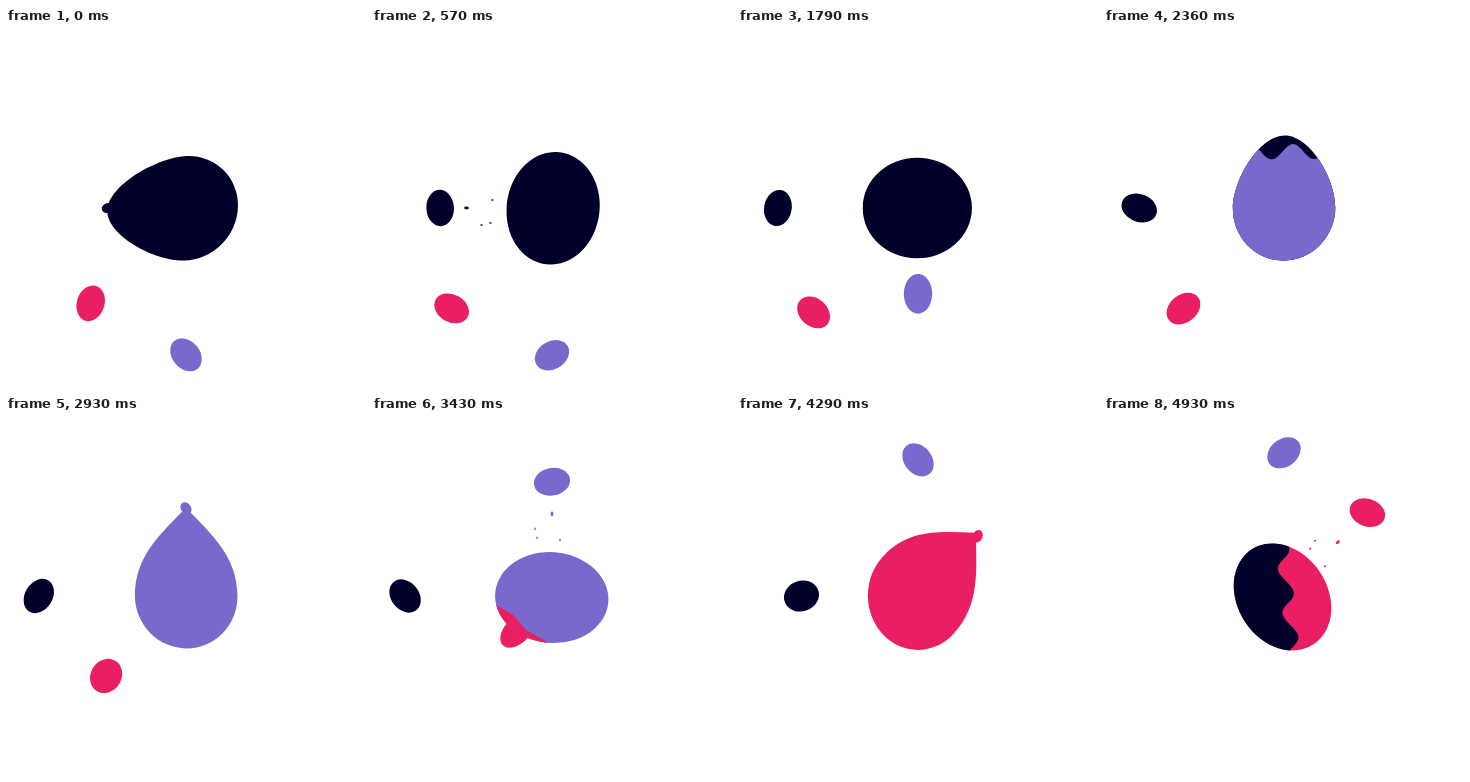
Write an HTML page with a canvas that moves like this. It is 360 px wide and 360 px high and loops after 5000 ms.

```html
<!DOCTYPE html>
<html lang="en">
<head>
<meta charset="utf-8">
<title>Colour drops</title>
<style>
  html, body { margin: 0; width: 100%; height: 100%; overflow: hidden; background: #fff; }
  canvas { display: block; width: 360px; height: 360px; }
</style>
</head>
<body>
<canvas id="stage"></canvas>
<script>
const LOOP = 5000, STEPS = 70, ORBIT = 5600;
const BALL = 52, DROP = 16;
const NAVY = '#00002a', VIOLET = '#7a69cd', PINK = '#e91e63';

// Each pass: a drop flies through the ball and leaves it at time `exit`.
// Below, `time` is always relative to that moment, in ms.
const passes = [
  { color: PINK, heading: 135, exit: -1400 },
  { color: NAVY, heading: 180, exit: 0 },
  { color: VIOLET, heading: -90, exit: 2800 },
  { color: PINK, heading: -45, exit: 4200 },
  { color: NAVY, heading: 0, exit: 5600 }
];
const TOUCH = -870, COVERED = -210;
const specks = [[82, 0], [67, -17], [58, -15], [56, 8]];

const canvas = document.getElementById('stage');
const ctx = canvas.getContext('2d');
const ratio = window.devicePixelRatio || 1;
canvas.width = canvas.height = 360 * ratio;

const rad = deg => deg * Math.PI / 180;
const clamp = x => Math.min(1, Math.max(0, x));

// Smooth step from 0 at `from` to 1 at `to`.
function ramp(time, from, to) {
  const k = clamp((time - from) / (to - from));
  return k * k * (3 - 2 * k);
}

const phase = time => (time + ORBIT) % ORBIT;
const falling = time => Math.max(0, phase(time) - 2800) / 1000;

// Signed position on the heading: slows down on the way out, then falls back.
function travel(time) {
  const distance = 150 - 72 * Math.exp(-phase(time) / 900) - 7.9 * falling(time) ** 3.6;
  return time < 0 ? -distance : distance;
}

// Squeezed while being hit, then a damped swing after the drop has left.
function squash(time) {
  const hit = -2.5 * Math.sin(Math.PI * ramp(time, TOUCH, -440));
  const t = Math.max(0, time - 300);
  return hit - 9 * Math.exp(-t / 1200) * Math.sin(2 * Math.PI * t / 1900);
}

function dropSize(time) {
  if (time < -40) return clamp((-600 - time) / 180);
  return .35 + .65 * ramp(time, 100, 400);
}

function ellipse(x, y, rx, ry, turn = 0) {
  ctx.beginPath();
  ctx.ellipse(x, y, rx, ry, turn, 0, 2 * Math.PI);
  ctx.fill();
}

function drawDrop(pass, time) {
  if (Math.abs(time) > ORBIT / 2) return;
  const size = dropSize(time);
  const speed = (falling(time) / 1.8) ** 3;
  const wobble = 2.2 * clamp(1 - speed);
  ctx.save();
  ctx.rotate(rad(pass.heading));
  ctx.fillStyle = pass.color;
  if (time > 480 && time < 800) {
    specks.forEach(([u, v], i) => {
      const r = i ? 1 : 1.8;
      ellipse(u - .06 * (time - 630), v, r * 1.3, r * .8);
    });
  }
  ctx.translate(travel(time), 0);
  ctx.scale(size * (1 + .25 * speed), size * (1 - .12 * speed));
  if (size > 0) ellipse(0, 0, DROP + wobble, DROP - wobble, rad(166 - .138 * phase(time)));
  ctx.restore();
}

// A round back and a front that swells, sharpens and snaps back.
function ballPath(heading, time) {
  const rise = ramp(time, -700, -350);
  const hold = 1 - ramp(time, 200, 420);
  const point = ramp(time, 0, 90) * hold;
  const reach = Math.max(BALL + 24 * rise, travel(time));
  const tip = BALL + (reach - BALL) * hold;
  const shoulder = 29 + 11 * point;
  const x = tip * (1 - .29 * point), y = 29 - 4 * rise * hold;
  ctx.save();
  ctx.rotate(rad(heading));
  ctx.beginPath();
  ctx.arc(0, 0, BALL, Math.PI / 2, Math.PI * 1.5);
  ctx.bezierCurveTo(shoulder, -BALL, x, -y, tip, 0);
  ctx.bezierCurveTo(x, y, shoulder, BALL, 0, BALL);
  ctx.closePath();
  ctx.restore();
}

// New colour behind a wavy edge that races in and slows down.
function drawSweep(pass, time) {
  const edge = -60 + 6.3 * Math.sqrt(Math.max(0, time + 780));
  const height = 7.5 * clamp((time + 800) / 130);
  const crest = 35 + .06 * time;
  ctx.save();
  ctx.rotate(rad(pass.heading));
  ctx.fillStyle = pass.color;
  ctx.beginPath();
  ctx.moveTo(-150, -100);
  for (let v = -100; v <= 100; v += 2) {
    ctx.lineTo(edge + height * Math.cos((v - crest) * 2 * Math.PI / 43), v);
  }
  ctx.lineTo(-150, 100);
  ctx.fill();
  ctx.restore();
}

function drawBall(now) {
  const hits = passes.filter(p => now - p.exit > TOUCH);
  const current = hits[hits.length - 1];
  const done = hits.filter(p => now - p.exit >= COVERED).pop();
  ctx.save();
  for (const p of hits) {
    const e = squash(now - p.exit);
    ctx.rotate(rad(p.heading));
    ctx.translate(.25 * e, 0);
    ctx.scale(1 + e / BALL, 1 - .7 * e / BALL);
    ctx.rotate(-rad(p.heading));
  }
  ballPath(current.heading, now - current.exit);
  ctx.fillStyle = done.color;
  ctx.fill();
  if (current !== done) {
    ctx.clip();
    drawSweep(current, now - current.exit);
  }
  ctx.restore();
}

function draw(now) {
  ctx.setTransform(ratio, 0, 0, ratio, 0, 0);
  ctx.fillStyle = '#fff';
  ctx.fillRect(0, 0, 360, 360);
  ctx.translate(180, 180);
  for (const p of passes) drawDrop(p, now - p.exit);
  drawBall(now);
}

const start = performance.now();
function tick() {
  const time = (performance.now() - start) % LOOP;
  const step = Math.floor(time * STEPS / LOOP + .1) % STEPS;
  draw(step * LOOP / STEPS);
  requestAnimationFrame(tick);
}
tick();
</script>
</body>
</html>
```
